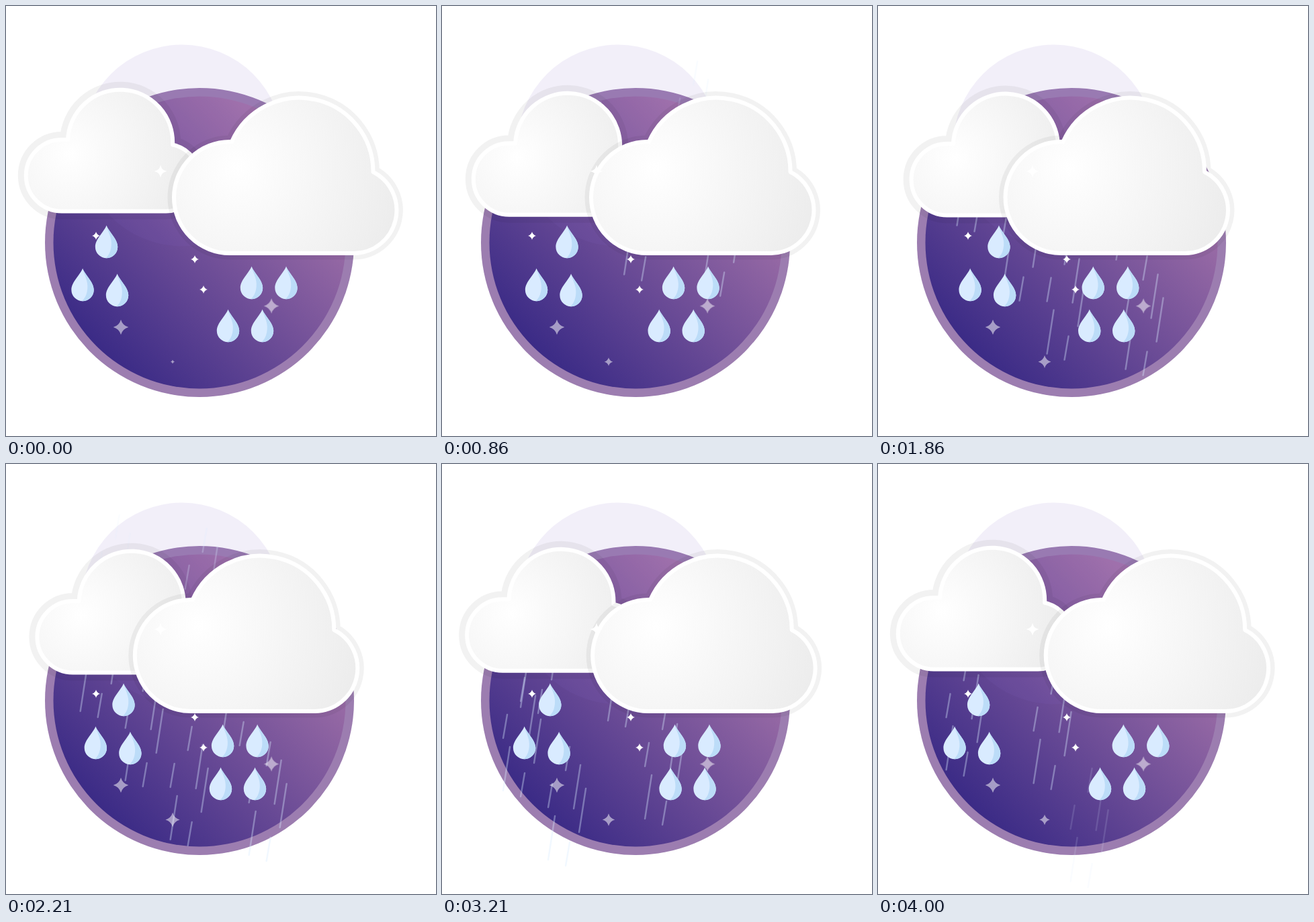
An HTML page that plays this animation: 640x640 px, repeating every 4.07 s.

```html
<!DOCTYPE html>
<html lang="en">
<head>
<meta charset="utf-8">
<title>Rainy clouds</title>
<style>
  html, body { margin: 0; width: 100%; height: 100%; overflow: hidden; background: #fff; }
  svg { display: block; width: 100vw; height: 100vh; }
</style>
</head>
<body>
<svg viewBox="0 0 640 640">
  <defs>
    <linearGradient id="night" gradientUnits="userSpaceOnUse" x1="135" y1="505" x2="441" y2="199">
      <stop offset="0" stop-color="#3b2b86"/>
      <stop offset="1" stop-color="#a976ab"/>
    </linearGradient>
    <radialGradient id="bigFill" gradientUnits="userSpaceOnUse" cx="345" cy="240" r="250">
      <stop offset="0" stop-color="#fff"/>
      <stop offset="1" stop-color="#ececec"/>
    </radialGradient>
    <radialGradient id="smallFill" gradientUnits="userSpaceOnUse" cx="95" cy="220" r="190">
      <stop offset="0" stop-color="#fff"/>
      <stop offset="1" stop-color="#ececec"/>
    </radialGradient>
    <path id="bigShape" d="M333 368A83 83 0 0 1 333 202L336 202A110 110 0 0 1 546.5 247A64 64 0 0 1 518 368Z"/>
    <path id="smallShape" d="M83 305.5A53.2 53.2 0 0 1 83 199L92 199A78 78 0 0 1 248 206.5A50 50 0 0 1 238 305.5Z"/>
    <path id="star" d="M0-1Q.22-.22 1 0Q.22.22 0 1Q-.22.22-1 0Q-.22-.22 0-1Z"/>
    <g id="drop">
      <path fill="#d9ebff" d="M0 0C3 9 16.7 20 16.7 32A16.7 16.7 0 0 1-16.7 32C-16.7 20-3 9 0 0Z"/>
      <path fill="#bcdcf8" d="M0 0C3 9 16.7 20 16.7 32A16.7 16.7 0 0 1-1 48.7C7 42 9 28 6 18S1 6 0 0Z"/>
    </g>
    <g id="streaks" fill="none" stroke="#d9ebff" stroke-opacity=".36" stroke-width="2.5" stroke-linecap="round">
      <path d="M16 28l-10 65M24 63l-10 65M-22 104l-10 65M0 1l-6 35M-26 56l-6 35M0 143l-6 35"/>
    </g>
  </defs>

  <circle cx="288" cy="352" r="230" fill="#9c7db0"/>
  <circle cx="288" cy="352" r="217.5" fill="url(#night)"/>
  <circle cx="262" cy="207.5" r="150" fill="#7d5fc3" opacity=".1"/>
  <circle id="glow" cx="282" cy="202" r="36" fill="#fff"/>
  <g id="rain"></g>
  <g id="smallCloud" stroke-linejoin="round">
    <use href="#smallShape" fill="none" stroke="#000" stroke-opacity=".05" stroke-width="24"/>
    <use href="#smallShape" fill="url(#smallFill)" stroke="#fff" stroke-width="6"/>
  </g>
  <g id="bigCloud" stroke-linejoin="round">
    <use href="#bigShape" fill="none" stroke="#000" stroke-opacity=".05" stroke-width="19"/>
    <use href="#bigShape" fill="url(#bigFill)" stroke="#fff" stroke-width="6"/>
  </g>
  <g fill="#fff">
    <use href="#star" transform="translate(230 246)scale(7)" stroke="#fff" stroke-width=".2"/>
    <use href="#star" transform="translate(134 342)scale(6)"/>
    <use href="#star" transform="translate(281 377)scale(6)"/>
    <use href="#star" transform="translate(294 422)scale(6)"/>
    <g opacity=".52">
      <use href="#star" transform="translate(171 478)scale(11.3)"/>
      <use href="#star" transform="translate(395 446.5)scale(11.3)"/>
      <use href="#star" id="pulse"/>
    </g>
  </g>
  <g id="leftTop"><use href="#drop" x="149.5" y="326.5"/></g>
  <g id="leftLow"><use href="#drop" x="114" y="390.5"/><use href="#drop" x="165.5" y="398.5"/></g>
  <g id="rightTop"><use href="#drop" x="365.5" y="387.5"/><use href="#drop" x="417" y="387.5"/></g>
  <g id="rightLow"><use href="#drop" x="330.5" y="451.5"/><use href="#drop" x="381.5" y="451.5"/></g>
</svg>
<script>
const LOOP = 4070;
const byId = id => document.getElementById(id);
const clamp = v => Math.max(0, Math.min(1, v));

// Piecewise linear value through [time, value] keys
function along(t, keys) {
  for (let i = 1; i < keys.length; i++) {
    const [t0, a] = keys[i - 1], [t1, b] = keys[i];
    if (t <= t1) return a + (b - a) * (t - t0) / (t1 - t0);
  }
  return keys[keys.length - 1][1];
}

const sway = (peakTime, amount) => [[0, 0], [peakTime, amount], [4010, 0]];
const moves = {
  bigCloud: sway(2000, -65),
  smallCloud: sway(1275, 25.3),
  leftTop: sway(1003, 42.6),
  leftLow: sway(1038, 32),
  rightTop: sway(1985, -48.3),
  rightLow: [[0, 0], [1945, -16.5], [3330, 12], [4000, 0]]
};
const pulseKeys = [[0, 3], [860, 6.3], [1500, 8.4], [2330, 11], [3210, 9.2], [4000, 7.7]];

// Rain bundles: x and y at time zero, y where the bundle has faded
const bundles = [
  [320, 129, 470], [253, 41, 470], [186, -62, 385], [212, -186, 470],
  [342, -166, 470], [397, -20, 470], [437, 152, 470]
].map(([x, y, end]) => {
  const node = document.createElementNS("http://www.w3.org/2000/svg", "use");
  node.setAttribute("href", "#streaks");
  byId("rain").append(node);
  return { node, x, y, end };
});

function draw(now) {
  const t = now % LOOP;
  for (const id in moves) {
    const x = along(t, moves[id]);
    const y = id === "smallCloud" ? x * .3 : 0;
    byId(id).setAttribute("transform", `translate(${x} ${y})`);
  }
  byId("pulse").setAttribute("transform", `translate(248 529.5)scale(${along(t, pulseKeys)})`);
  byId("glow").setAttribute("opacity", .1 * clamp(1 - Math.abs(t - 1500) / 350));
  for (const { node, x, y, end } of bundles) {
    const top = y + .118 * t;
    node.setAttribute("transform", `translate(${x - .0196 * t} ${top})`);
    node.setAttribute("opacity",
      clamp((t - 300) / 400) * clamp((top - 60) / 50) * clamp((end - top) / 45));
  }
  requestAnimationFrame(draw);
}
draw(0);
</script>
</body>
</html>
```
